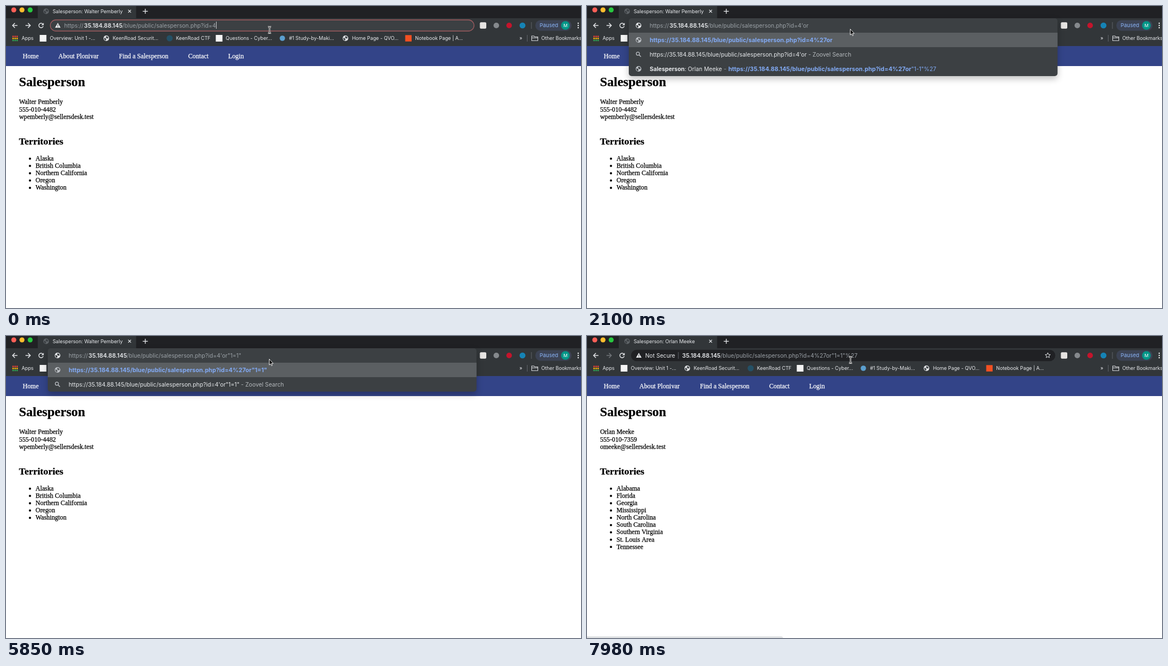
Recreate the animation shown at these times as an HTML page with a canvas. Size 1032 by 543 pixels, loop 8 s.

```html
<!DOCTYPE html>
<html lang="en">
<head>
<meta charset="utf-8">
<title>Salesperson lookup</title>
<style>
  html, body { margin: 0; width: 100%; height: 100%; overflow: hidden; background: #fff; }
  canvas { display: block; width: 1032px; height: 543px; }
</style>
</head>
<body>
<canvas id="stage"></canvas>
<script>
const W = 1032, H = 543, LOOP = 8000;
const canvas = document.getElementById('stage');
const ctx = canvas.getContext('2d');
const ratio = window.devicePixelRatio || 1;
canvas.width = W * ratio;
canvas.height = H * ratio;

const SANS = 'Inter, Roboto, sans-serif';
const SERIF = '"Liberation Serif", "Times New Roman", serif';
const BAR = '#323639', DARK = '#202124', FIELD = '#3c4043', PICKED = '#5b5f62';
const LIGHT = '#e8eaed', GREY = '#9aa0a6', ICON = '#bdc1c6', BLUE = '#82aaf4';
const HOST = '35.184.88.145', PATH = '/blue/public/salesperson.php?id=4';
const URL_TEXT = 'https://' + HOST + PATH;

// time at which the text after the id is complete
const TYPED = [[900, "'"], [1350, "'o"], [1650, "'or"], [2400, "'or\""], [3300, "'or\"1"],
  [3750, "'or\"1="], [4050, "'or\"1=1"], [5400, "'or\"1=1\""], [6000, "'or\"1=1\"'"]];
const CARET_OFF = [[450, 900], [2100, 2400], [2850, 3300], [4650, 5100], [5850, 6000], [6450, 7050]];
const POPUP = 900, SUBMIT = 7350, COMMIT = 7830, LOADED = 7980;

const PEOPLE = [
  { name: 'Walter Pemberly', phone: '555-010-4482', mail: 'wpemberly@sellersdesk.test',
    areas: ['Alaska', 'British Columbia', 'Northern California', 'Oregon', 'Washington'] },
  { name: 'Orlan Meeke', phone: '555-010-7359', mail: 'omeeke@sellersdesk.test',
    areas: ['Alabama', 'Florida', 'Georgia', 'Mississippi', 'North Carolina', 'South Carolina',
      'Southern Virginia', 'St. Louis Area', 'Tennessee'] }
];

function text(str, x, y, size, color, weight = 400, family = SANS) {
  ctx.font = `${weight} ${size}px ${family}`;
  ctx.fillStyle = color;
  ctx.fillText(str, x, y);
  return x + ctx.measureText(str).width;
}

// serif text with slightly heavier strokes
function serif(str, x, y, size = 11.7, color = '#000', weight = 400) {
  text(str, x, y, size, color, weight, SERIF);
  ctx.strokeStyle = color;
  ctx.lineWidth = .25;
  ctx.strokeText(str, x, y);
}

function rect(x, y, w, h, color, r = 0) {
  ctx.fillStyle = color;
  ctx.beginPath();
  ctx.roundRect(x, y, w, h, r);
  ctx.fill();
}

function disc(x, y, r, color) {
  ctx.fillStyle = color;
  ctx.beginPath();
  ctx.arc(x, y, r, 0, Math.PI * 2);
  ctx.fill();
}

function arc(x, y, r, from, to, color, width, back = false) {
  ctx.strokeStyle = color;
  ctx.lineWidth = width;
  ctx.beginPath();
  ctx.arc(x, y, r, from, to, back);
  ctx.stroke();
}

function line(points, color, width = 1, close = false) {
  ctx.strokeStyle = color;
  ctx.lineWidth = width;
  ctx.beginPath();
  points.forEach(([x, y]) => ctx.lineTo(x, y));
  if (close) ctx.closePath();
  ctx.stroke();
}

function poly(points, color) {
  ctx.fillStyle = color;
  ctx.beginPath();
  points.forEach(([x, y]) => ctx.lineTo(x, y));
  ctx.fill();
}

function cross(x, y, r, color, width) {
  line([[x - r, y - r], [x + r, y + r]], color, width);
  line([[x - r, y + r], [x + r, y - r]], color, width);
}

function globe(x, y, color, land) {
  disc(x, y, 5, color);
  poly([[x - 4, y - 1], [x - 1, y], [x, y + 2], [x - 1.3, y + 4.2], [x - 3.5, y + 2.4]], land);
  poly([[x, y - 4], [x + 3, y - 2.8], [x + 3.8, y], [x + 1, y + .6], [x - 1, y - 1.5]], land);
}

function arrow(x, y, dir, color) {
  line([[x - 4.5 * dir, y], [x + 4 * dir, y]], color, 1.4);
  line([[x, y - 4.2], [x + 4.2 * dir, y], [x, y + 4.2]], color, 1.4);
}

function warning(x, y) {
  poly([[x, y - 4.8], [x + 5, y + 4], [x - 5, y + 4]], LIGHT);
  rect(x - .5, y - 1.6, 1, 2.8, DARK);
  rect(x - .5, y + 2, 1, 1, DARK);
}

function info(x, y) {
  arc(x, y, 4.4, 0, Math.PI * 2, LIGHT, 1.1);
  rect(x - .5, y - .8, 1, 3.2, LIGHT);
  rect(x - .5, y - 2.6, 1, 1.1, LIGHT);
}

function reload(x, y) {
  arc(x, y, 4, .3, 5.5, LIGHT, 1.4);
  poly([[x + 4.7, y - 4.8], [x + 4.7, y - .4], [x + .3, y - .4]], LIGHT);
}

function star(x, y) {
  const points = Array.from({ length: 10 }, (_, i) => {
    const a = i * Math.PI / 5 - Math.PI / 2, r = i % 2 ? 2.2 : 5;
    return [x + r * Math.cos(a), y + r * Math.sin(a)];
  });
  line(points, '#d5d7da', 1, true);
}

function tabStrip(t, person) {
  rect(0, 0, W, 22, DARK);
  rect(57, -8, 176.5, 38, BAR, 6);
  ['#ff5f57', '#ffbd2e', '#28c840'].forEach((c, i) => disc(14 + i * 14.7, 7, 4.5, c));
  if (t < SUBMIT || t >= LOADED) {
    globe(72, 9.5, '#5f6468', '#3b3f43');
  } else {
    const sweep = t < 7500 ? .3 : t < 7650 ? 1 : t < COMMIT ? 1.6 : 2.4;
    arc(72, 9.5, 4.8, -Math.PI / 2, -Math.PI / 2 - sweep, '#c4c7ca', 1.4, true);
  }
  text('Salesperson: ' + person.name, 83.7, 12.7, 8.85, LIGHT);
  cross(221.8, 9.4, 2.5, LIGHT, 1.2);
  line([[245.5, 9.5], [254.5, 9.5]], LIGHT, 1.3);
  line([[250, 5], [250, 14]], LIGHT, 1.3);
}

function toolbar(t) {
  rect(0, 22, W, 50, BAR);
  arrow(16, 35, -1, LIGHT);
  arrow(39.5, 35, 1, t < COMMIT ? LIGHT : '#75797d');
  if (t >= SUBMIT && t < LOADED) cross(63, 35, 3.8, LIGHT, 1.4);
  else reload(63, 35);

  rect(850.5, 29.2, 11.5, 11.5, '#e6e4e2', 2);
  disc(880, 35, 5, '#85898d');
  disc(903, 35, 5, '#c4142c');
  disc(927, 35, 5.3, '#1583b5');
  rect(942.5, 29, 1, 12, '#5f6368');
  rect(950, 25.5, 65, 19, '#3c4354', 9.5);
  text('Paused', 957.7, 38.3, 9.5, '#8ab4f8');
  disc(1004, 35, 7.8, '#009688');
  text('M', 1000.6, 38, 8.2, '#fff');
  [-4, 0, 4].forEach(d => disc(1027, 35 + d, 1.2, LIGHT));
}

function bookmarks() {
  const colors = ['#ea4335', '#fbbc04', '#34a853'];
  for (let i = 0; i < 9; i++) {
    const row = Math.floor(i / 3);
    rect(11.5 + (i % 3) * 3.6, 53.5 + row * 3.6, 2.5, 2.5, colors[row]);
  }
  [66.5, 382.5].forEach(x => rect(x - 6, 52, 12, 12, '#f4f4f4'));
  [180, 609.3].forEach(x => globe(x, 58, '#e3e5e7', '#43484c'));
  disc(293.7, 58, 5.5, '#245066');
  disc(496, 58, 4.8, '#5b9fcf');
  rect(716.5, 52.3, 11.5, 11.5, '#f25022');
  [[28, 'Apps'], [78.7, 'Overview: Unit 1 -...'], [191.5, 'KeenRoad Securit...'], [305, 'KeenRoad CTF'],
   [394.3, 'Questions - Cyber...'], [508, '#1 Study-by-Maki...'], [621, 'Home Page - QVO...'],
   [734.3, 'Notebook Page | A...'], [921.5, '»'], [960.7, 'Other Bookmarks']]
    .forEach(([x, s]) => text(s, x, 61.2, 8.8, LIGHT));
  rect(935, 52, 1, 12, '#5f6368');
  line([[943.5, 54], [947.5, 54], [949, 55.5], [954.5, 55.5], [954.5, 62.3], [943.5, 62.3]], '#d5d7da', 1.1, true);
  line([[943.5, 57.3], [954.5, 57.3]], '#d5d7da', 1);
}

function page(person) {
  rect(0, 72, W, 36, '#334488');
  [[30, 'Home'], [94, 'About Plonivar'], [202.7, 'Find a Salesperson'], [327, 'Contact'], [398.8, 'Login']]
    .forEach(([x, s]) => serif(s, x, 94.3, 11.75, '#fff'));
  serif('Salesperson', 23.3, 144.4, 23.5, '#000', 700);
  [person.name, person.phone, person.mail].forEach((s, i) => serif(s, 23.4, 176.4 + i * 13.1));
  serif('Territories', 23.3, 249, 17.4, '#000', 700);
  person.areas.forEach((s, i) => {
    const y = 277.8 + i * 13.1;
    disc(43, y - 3.3, 2, '#000');
    serif(s, 53, y);
  });
}

// address with a bright host; returns the right end
function address(x, tail, scheme) {
  const y = 38.6;
  if (scheme) {
    text('https://', x, y, 10.2, GREY);
    x += 35.7;
  }
  text(HOST, x, y, 10.4, LIGHT, 600);
  return text(PATH + tail, x + 68.7, y, 10.2, GREY);
}

function caret(t, x) {
  if (!CARET_OFF.some(([a, b]) => t >= a && t < b)) rect(Math.round(x), 28, 1, 13, '#c4c7ca');
}

function suggestions(typed) {
  globe(92.5, 61, ICON, PICKED);
  text(URL_TEXT + typed.replace(/'/g, '%27'), 112.4, 64.7, 10.62, BLUE, 700);
  arc(91.3, 85.8, 2.9, 0, Math.PI * 2, ICON, 1.2);
  line([[93.5, 88], [96.8, 91.3]], ICON, 1.4);
  const x = text(URL_TEXT + typed, 112.4, 90.7, 10.25, LIGHT);
  text(' - Zoovel Search', x, 90.7, 10.25, '#b4b8bc');
}

function history(t, typed) {
  const y = 116.7;
  globe(92.5, 113, ICON, FIELD);
  let x = text('Salesperson', 112.5, y, 10.3, LIGHT, 700);
  text(': ' + PEOPLE[1].name, x, y, 10.2, LIGHT);
  text('-', 245.5, y, 10.2, GREY);
  x = 253.7;
  const run = (s, bold) => { x = text(s, x, y, bold ? 10.62 : 10.25, BLUE, bold ? 700 : 400); };
  const rest = '"1-1"%27';
  if (t < 2400) {
    const hit = typed.slice(1);
    run(URL_TEXT + '%27' + hit, true);
    run('or'.slice(hit.length) + rest, false);
  } else {
    // only whole words match once a quote is typed
    (URL_TEXT + '%27or').split(/(\W+)/).forEach(s => run(s, /\w/.test(s)));
    run(rest, false);
  }
}

function popup(t, typed) {
  const bottom = t < 3750 ? 126 : 100;
  ctx.save();
  ctx.shadowColor = 'rgba(0,0,0,.25)';
  ctx.shadowBlur = 12 * ratio;
  ctx.shadowOffsetY = 5 * ratio;
  rect(75, 22, 769.5, bottom - 22, FIELD, 5);
  ctx.restore();
  rect(75, 48, 769.5, 26, PICKED);
  globe(92.5, 35, LIGHT, FIELD);
  caret(t, address(112.4, typed, true) + .4);
  suggestions(typed);
  if (t < 3750) history(t, typed);
}

function omnibox(t) {
  const editing = t < POPUP;
  rect(79, 24.7, 761.5, 20.6, editing ? FIELD : DARK, 10.3);
  if (editing) {
    ctx.strokeStyle = '#9c5a5e';
    ctx.lineWidth = 1.3;
    ctx.beginPath();
    ctx.roundRect(79.5, 25, 760.5, 20, 10);
    ctx.stroke();
    warning(93, 35);
    caret(t, address(104.4, '', true) + .4);
    return;
  }
  star(827, 35);
  const tail = '%27or"1=1"%27';
  if (t < COMMIT) {
    info(93, 35);
    address(104.6, tail);
  } else if (t < LOADED) {
    warning(93, 35);
    address(115.6, tail);
  } else {
    warning(93, 35);
    text('Not Secure', 104.4, 38.6, 10.2, LIGHT);
    rect(163.5, 29, 1, 12, '#5f6368');
    address(170.8, tail);
  }
}

function pointer(t) {
  if (t >= 750 && t < SUBMIT) {
    const shape = [[472.5, 41.5], [472.5, 52], [474.9, 49.8], [476.5, 53.5], [478, 52.8], [476.5, 49.3], [479.6, 49.3]];
    poly(shape, '#000');
    line(shape, '#fff', .9, true);
    return;
  }
  [['#e4e4e4', 2.6], ['#1a1a1a', .9]].forEach(([c, w]) => {
    line([[473, 38.5], [473, 47.5]], c, w);
    line([[470, 37.3], [471.6, 37.3], [473, 38.6], [474.4, 37.3], [476, 37.3]], c, w);
    line([[470, 48.7], [471.6, 48.7], [473, 47.4], [474.4, 48.7], [476, 48.7]], c, w);
  });
}

function draw(t) {
  ctx.setTransform(ratio, 0, 0, ratio, 0, 0);
  rect(0, 0, W, H, '#fff');
  const person = PEOPLE[t < LOADED ? 0 : 1];
  let typed = '';
  for (const [at, s] of TYPED) if (t >= at) typed = s;

  page(person);
  tabStrip(t, person);
  toolbar(t);
  bookmarks();
  omnibox(t);
  if (t >= POPUP && t < SUBMIT) popup(t, typed);
  if (t >= SUBMIT && t < 7500) {
    ctx.globalAlpha = .13;
    suggestions(typed);
    ctx.globalAlpha = 1;
  }
  if (t >= 7500) rect(-6, 540, 358, 12, '#dfe1e3', 4);
  pointer(t);
}

const start = performance.now();
function tick() {
  draw((performance.now() - start) % LOOP);
  requestAnimationFrame(tick);
}
tick();
</script>
</body>
</html>
```
